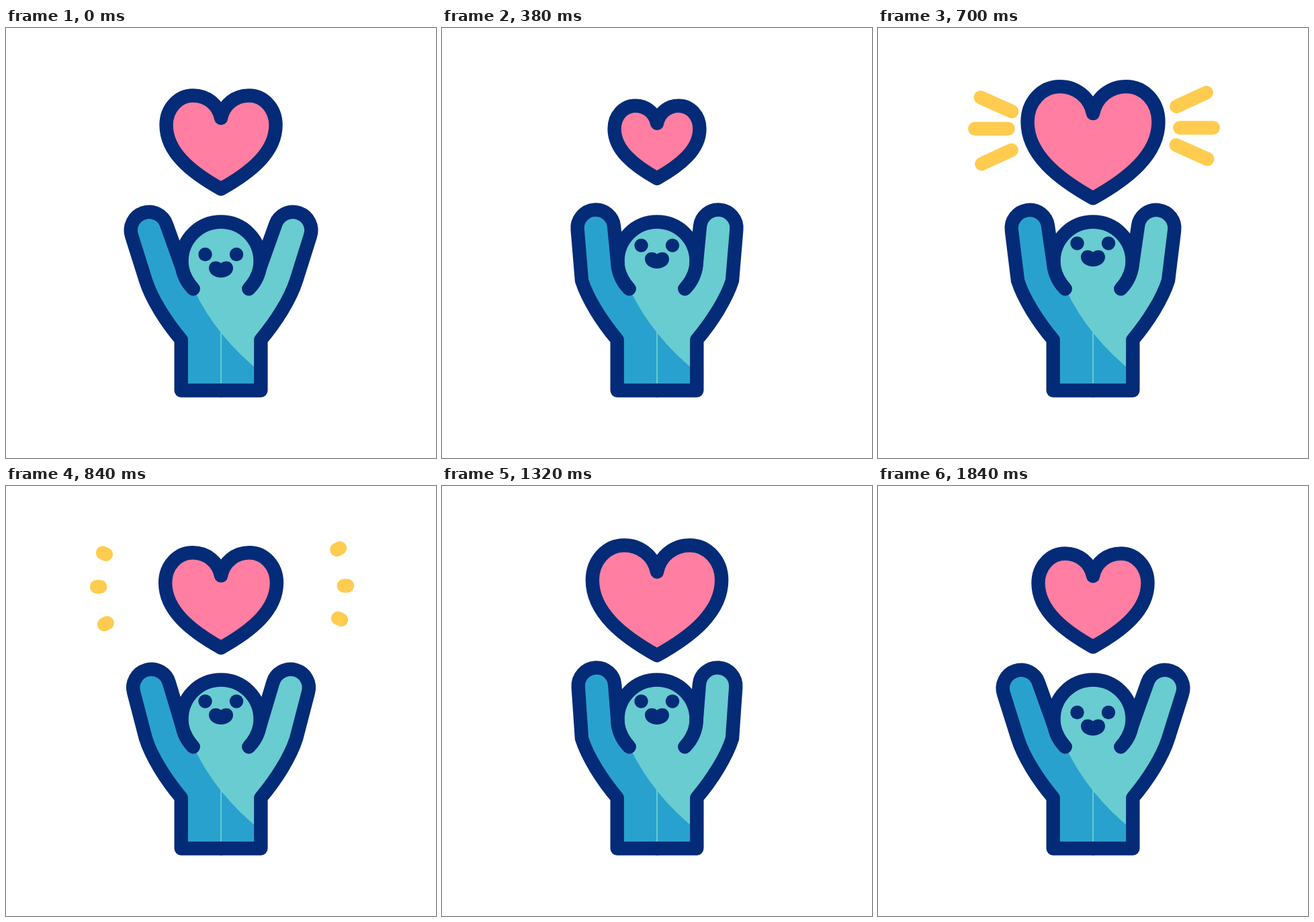
These frames come from a looping animation (640 px wide and 640 px high, 2400 ms). An HTML page with a canvas:

```html
<!DOCTYPE html>
<html lang="en">
<head>
<meta charset="utf-8">
<title>Cheering with a heart</title>
<style>
  html, body { margin: 0; width: 100%; height: 100%; overflow: hidden; background: #fff; }
  canvas { display: block; width: 100vmin; height: 100vmin; }
</style>
</head>
<body>
<canvas id="stage" width="640" height="640"></canvas>
<script>
const ctx = document.getElementById('stage').getContext('2d');
const LOOP = 2400;
const NAVY = '#042b77', TEAL = '#68ccd1', BLUE = '#29a1ce', PINK = '#ff7ea1', YELLOW = '#ffcc50';

// Keys are [time, value] pairs; each leg eases in and out.
const HEART = [[0, 1], [355, 0.772], [690, 1.197], [1025, 0.772], [1365, 1.197], [1575, 1]];
const ARMS = [[0, 18.7], [533, 2], [960, 18.7], [1433, 2], [1840, 18.7]];
const FACE = [[0, 0], [533, -16.5], [1400, -16.5], [1840, 0]];
const RAY_HEAD = [[510, 0], [760, 1]];
const RAY_TAIL = [[635, 0], [885, 1]];

// Inner and outer ends of the rays on the left side.
const RAYS = [[210, 129, 144, 99.5], [205, 150, 135, 150], [209, 177, 146, 206]];

const ease = p => (1 - Math.cos(Math.PI * p)) / 2;
const mix = (a, b, p) => a + (b - a) * p;

function valueAt(keys, t) {
  if (t <= keys[0][0]) return keys[0][1];
  for (let i = 1; i < keys.length; i++) {
    const [t0, v0] = keys[i - 1], [t1, v1] = keys[i];
    if (t < t1) return mix(v0, v1, ease((t - t0) / (t1 - t0)));
  }
  return keys[keys.length - 1][1];
}

function fill(path, color) {
  ctx.fillStyle = color;
  ctx.fill(path);
}

function stroke(path, color) {
  ctx.strokeStyle = color;
  ctx.stroke(path);
}

function circle(x, y, r) {
  const p = new Path2D();
  p.arc(x, y, r, 0, Math.PI * 2);
  return p;
}

function drawRays(t) {
  const head = valueAt(RAY_HEAD, t), tail = valueAt(RAY_TAIL, t);
  if (head <= 0 || tail >= 1) return;
  const p = new Path2D();
  for (const [x0, y0, x1, y1] of RAYS) {
    const ax = mix(x0, x1, tail), ay = mix(y0, y1, tail);
    const bx = mix(x0, x1, head), by = mix(y0, y1, head);
    p.moveTo(ax, ay);
    p.lineTo(bx, by);
    p.moveTo(643 - ax, 298.5 - ay);
    p.lineTo(643 - bx, 298.5 - by);
  }
  stroke(p, YELLOW);
}

function drawHeart(s) {
  const p = new Path2D();
  const X = x => 320 + x * s, Y = y => 169 + (y - 169) * s;
  const curve = (a, b, c, d, e, f) => p.bezierCurveTo(X(a), Y(b), X(c), Y(d), X(e), Y(f));
  p.moveTo(X(0), Y(134));
  curve(4, 114, 21, 100.5, 41.5, 100.5);
  curve(64, 100.5, 81.5, 120, 81.5, 144.5);
  curve(81.5, 185, 44, 215, 0, 239.5);
  curve(-44, 215, -81.5, 185, -81.5, 144.5);
  curve(-81.5, 120, -64, 100.5, -41.5, 100.5);
  curve(-21, 100.5, -4, 114, 0, 134);
  p.closePath();
  fill(p, PINK);
  stroke(p, NAVY);
}

// Neck to waist, around one raised arm; side is 1 for right, -1 for left.
function armPath(side, deg) {
  const a = deg * Math.PI / 180, r = 27.3;
  const tx = 85 + 68.5 * Math.sin(a), ty = 366 - 68.5 * Math.cos(a);
  const X = x => 320 + side * x;
  const p = new Path2D();
  p.moveTo(X(41.5), 388);
  p.quadraticCurveTo(X(54), 374, X(58), 357);
  p.lineTo(X(tx - r * Math.cos(a)), ty - r * Math.sin(a));
  const from = side > 0 ? Math.PI + a : -a;
  p.arc(X(tx), ty, r, from, from + side * Math.PI, side < 0);
  p.lineTo(X(112), 376);
  p.bezierCurveTo(X(103), 404, X(82), 437, X(59.3), 464);
  p.lineTo(X(59.3), 539.5);
  p.lineTo(320, 539.5);
  return p;
}

function drawBody(deg) {
  const left = armPath(-1, deg), right = armPath(1, deg);
  const torso = new Path2D();
  torso.rect(300, 388, 40, 151.5);
  const body = new Path2D();
  for (const [side, arm] of [[-1, left], [1, right]]) {
    const half = new Path2D(arm);
    half.lineTo(320 - side, 539.5);
    half.lineTo(320 - side, 388);
    half.closePath();
    fill(half, TEAL);
    body.addPath(half);
  }
  fill(torso, TEAL);
  fill(circle(320, 347, 58.5), TEAL);

  ctx.save();
  ctx.clip(body);
  const shade = new Path2D();
  shade.moveTo(279, 388);
  shade.quadraticCurveTo(313, 460, 380, 513);
  shade.lineTo(380, 560);
  shade.lineTo(100, 560);
  shade.lineTo(100, 200);
  shade.lineTo(266, 200);
  shade.lineTo(266, 357);
  shade.closePath();
  fill(shade, BLUE);
  ctx.restore();

  stroke(left, NAVY);
  stroke(right, NAVY);
  const head = new Path2D();
  head.arc(320, 347, 58.5, Math.PI * 0.75, Math.PI * 2.25);
  stroke(head, NAVY);
}

function drawFace(dy) {
  fill(circle(296.5, 337 + dy, 10.2), NAVY);
  fill(circle(343, 337 + dy, 10.2), NAVY);
  const p = new Path2D();
  const y = 350 + dy;
  p.moveTo(320, y);
  p.bezierCurveTo(315, y - 5, 302, y - 4, 302, y + 7.5);
  p.bezierCurveTo(302, y + 16, 311, y + 21.5, 320, y + 21.5);
  p.bezierCurveTo(329, y + 21.5, 338, y + 16, 338, y + 7.5);
  p.bezierCurveTo(338, y - 4, 325, y - 5, 320, y);
  fill(p, NAVY);
}

function frame() {
  const t = performance.now() % LOOP;
  ctx.fillStyle = '#fff';
  ctx.fillRect(0, 0, 640, 640);
  ctx.lineWidth = 20.4;
  ctx.lineCap = ctx.lineJoin = 'round';
  drawRays(t);
  drawHeart(valueAt(HEART, t));
  drawBody(valueAt(ARMS, t));
  drawFace(valueAt(FACE, t));
  requestAnimationFrame(frame);
}
frame();
</script>
</body>
</html>
```
